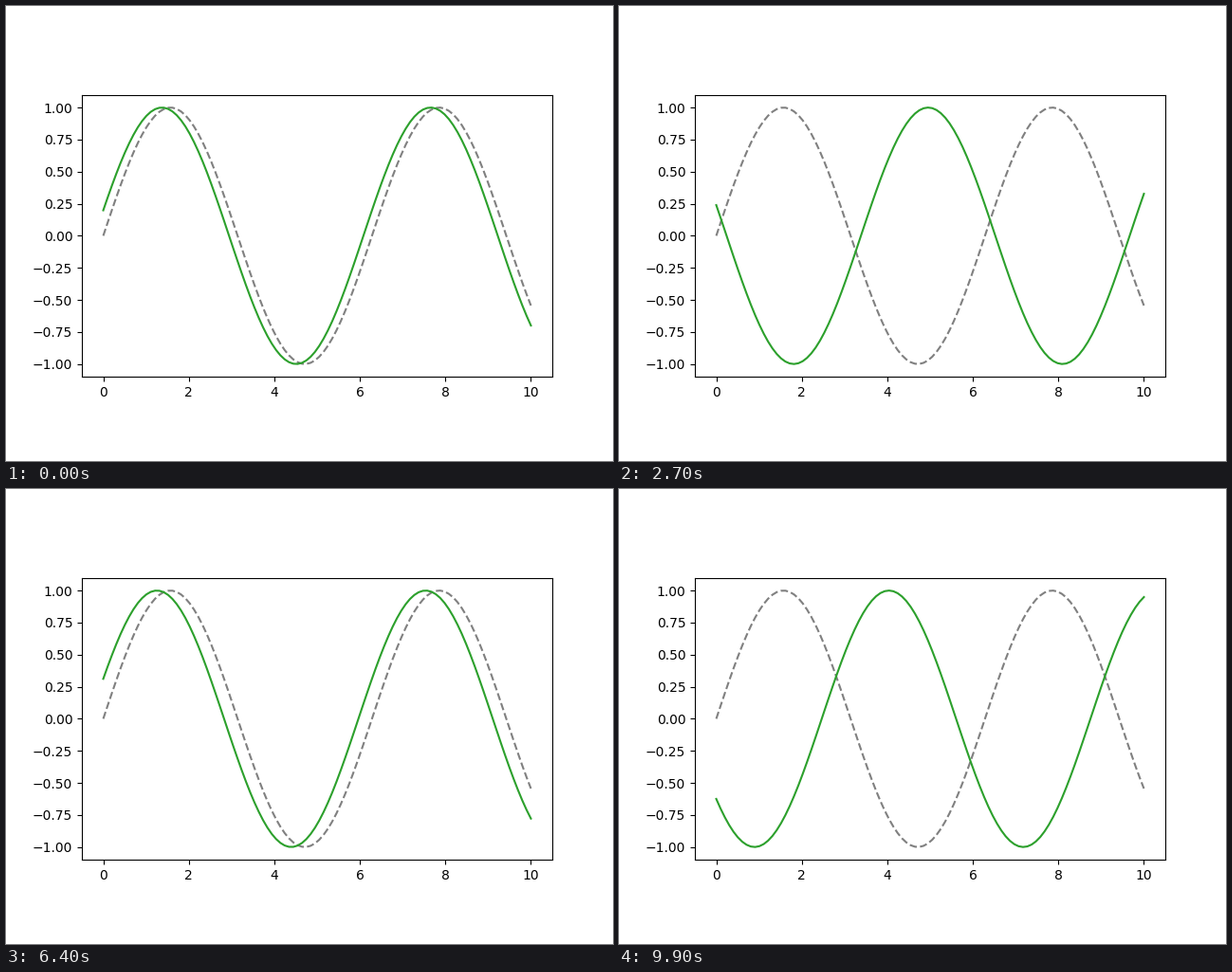
These frames come from a looping animation (640 by 480 pixels, 10000 ms). A matplotlib script:

```python
import numpy as np
import matplotlib.pyplot as plt
from matplotlib.animation import FuncAnimation

FRAMES = 100
INTERVAL = 100  # ms
START_PHASE = 0.2
PHASE_STEP = 0.1

x = np.linspace(0, 10, 100)


def wave(frame):
    return np.sin(x + START_PHASE + PHASE_STEP * frame)


fig, ax = plt.subplots(figsize=(6.4, 4.8), dpi=100)
ax.set_aspect(3)
ax.plot(x, np.sin(x), "--", color="gray")
line, = ax.plot(x, wave(0), color="tab:green")
ax.set_xlim(-0.5, 10.5)
ax.set_ylim(-1.1, 1.1)


def update(frame):
    line.set_ydata(wave(frame))
    return line,


anim = FuncAnimation(fig, update, frames=FRAMES, interval=INTERVAL,
                     repeat=True, repeat_delay=0)
plt.show()
```
